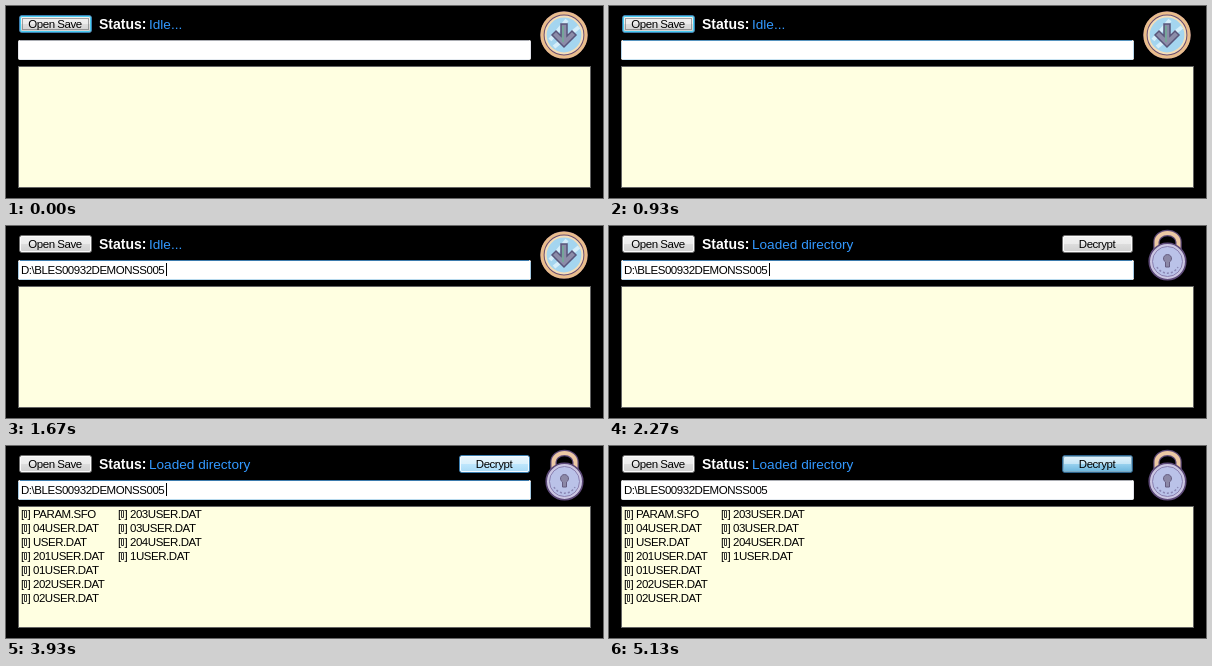
Animation of 597 by 192 pixels, one loop 8000 ms. Source, as an HTML page:

```html
<!DOCTYPE html>
<html lang="en">
<head>
<meta charset="utf-8">
<title>Save loader</title>
<style>
  html, body { margin: 0; height: 100%; overflow: hidden; background: #000; }
  svg { display: block; font: 11.5px "Liberation Sans", Arial, sans-serif; letter-spacing: -0.04em; }
  .status { letter-spacing: 0; }
  text { white-space: pre; }
</style>
</head>
<body>
<svg id="stage" width="597" height="192" viewBox="0 0 597 192"></svg>
<script>
const LOOP = 8000;
const PATH = 'D:\\BLES00932DEMONSS005';
const COLUMNS = [
  ['PARAM.SFO', '04USER.DAT', 'USER.DAT', '201USER.DAT', '01USER.DAT', '202USER.DAT', '02USER.DAT'],
  ['203USER.DAT', '03USER.DAT', '204USER.DAT', '1USER.DAT'],
];

// Button: border, inner line, four gradient stops. Field: top, sides, bottom.
const BUTTONS = {
  normal: ['#707070', '#fcfcfc', '#f2f2f2', '#ebebeb', '#dddddd', '#cfcfcf'],
  focused: ['#3c7fb1', '#48cdf0', '#f2f2f2', '#ebebeb', '#dddddd', '#cfcfcf'],
  hot: ['#3c7fb1', '#f4fbff', '#eaf6fd', '#d9f0fc', '#bee6fd', '#a7d9f5'],
  pressed: ['#2c628b', '#7ba7c0', '#e5f4fc', '#c4e5f6', '#98d1ef', '#68b3db'],
};
const FIELDS = {
  normal: ['#abadb3', '#e2e3ea', '#e3e9ef'],
  hot: ['#5794bf', '#b7d5ea', '#c7e2f1'],
  focused: ['#3d7bad', '#a4c9e3', '#b7d9ed'],
};

// Each step changes part of the state and keeps the rest.
const STEPS = [
  [0, { open: 'focused', decrypt: '', field: 'normal', path: '', caret: 0, loaded: false, list: false }],
  [930, { field: 'hot' }],
  [1330, { open: 'normal', field: 'focused', caret: 15 }],
  [1670, { path: PATH, caret: 160 }],
  [2270, { loaded: true, decrypt: 'normal' }],
  [2400, { list: true }],
  [3930, { decrypt: 'hot' }],
  [5130, { decrypt: 'pressed', field: 'normal', caret: 0 }],
];

const text = (x, y, s, attrs = '') => `<text x="${x}" y="${y}" ${attrs}>${s}</text>`;
const line = (d, color) => `<path d="${d}" fill="none" stroke="${color}"/>`;

function button(x, w, label, look) {
  const [border, inner, ...stops] = BUTTONS[look];
  const offsets = [0, 0.5, 0.5, 1];
  const id = 'fill' + x;
  const dots = look === 'focused'
    ? `<rect x="${x + 3.5}" y="12.5" width="${w - 7}" height="11" fill="none" stroke="#555" stroke-dasharray="1"/>` : '';
  return `<linearGradient id="${id}" x2="0" y2="1">${stops.map((c, i) =>
      `<stop offset="${offsets[i]}" stop-color="${c}"/>`).join('')}</linearGradient>
    <rect x="${x + 0.5}" y="9.5" width="${w - 1}" height="17" rx="2.5" fill="url(#${id})" stroke="${border}"/>
    <rect x="${x + 1.5}" y="10.5" width="${w - 3}" height="15" rx="1.5" fill="none" stroke="${inner}"/>
    ${dots}${text(x + w / 2 - 0.5, 22, label, 'text-anchor="middle"')}`;
}

function field({ field, path, caret }) {
  const [top, side, bottom] = FIELDS[field];
  return `<rect x="12" y="34" width="513" height="20" rx="2" fill="#fff"/>`
    + line('M12.5 36V52M524.5 36V52', side) + line('M14 53.5H523', bottom) + line('M14 34.5H523', top)
    + text(15, 48, path) + (caret ? line(`M${caret + 0.5} 37V50`, '#000') : '');
}

function fileList() {
  return COLUMNS.map((names, col) => names.map((name, row) => {
    const x = 15 + 97 * col, y = 72 + 14 * row;
    return text(x, y, '[') + text(x + 6.5, y, ']') + text(x + 12, y, name)
      + line(`M${x + 3.5} ${y - 7.5}h2v7h-2z`, '#333');
  }).join('')).join('');
}

const ARROW = `
  <circle cx="558" cy="29" r="23.7" fill="#694c70"/>
  <circle cx="558" cy="29" r="22" fill="none" stroke="#e9bd8c" stroke-width="3.2"/>
  <circle cx="558" cy="29" r="18.4" fill="#a4d5ef" stroke="#f4deb9" stroke-width="2"/>
  <path d="M544 34L561 14M548 41L573 21" stroke="#d5eefa" stroke-width="4"/>
  <path d="M555 18h6v12l5-5 4 4-12 12-12-12 4-4 5 5z" fill="#8c8ca8" stroke="#58557a" stroke-width="1.5"/>
  <path d="M557 20v16" stroke="#75a699" stroke-width="2"/>`;

const LOCK = `
  <path d="M547.5 24V16a11 9 0 0 1 22 0V24" fill="none" stroke="#5d4a78" stroke-width="6.5"/>
  <path d="M547.5 24V16a11 9 0 0 1 22 0V24" fill="none" stroke="#ecc8a4" stroke-width="4"/>
  <circle cx="558.5" cy="35.5" r="18.3" fill="#cbc6e2" stroke="#5d4a78" stroke-width="1.6"/>
  <circle cx="558.5" cy="35.5" r="15" fill="#bac2e8" stroke="#8a80b0"/>
  <path d="M548 41a12 12 0 0 0 21 0" fill="none" stroke="#8a86b4" stroke-width="1.5" stroke-dasharray="2"/>
  <path d="M556.5 36a4 4 0 1 1 4 0v5h-4z" fill="#8c88a6" stroke="#655c80"/>`;

const stage = document.getElementById('stage');

function render(state) {
  stage.innerHTML = `<rect width="597" height="192"/>
    ${button(13, 73, 'Open Save', state.open)}
    ${text(93, 23, 'Status:', 'class="status" fill="#fff" font-size="14" font-weight="bold"')}
    ${text(143, 23, state.loaded ? 'Loaded directory' : 'Idle...', 'class="status" fill="#3399ff" font-size="13.6"')}
    ${state.decrypt ? button(453, 71, 'Decrypt', state.decrypt) : ''}
    ${state.loaded ? LOCK : ARROW}
    ${field(state)}
    <rect x="12.5" y="60.5" width="572" height="121" fill="#ffffe1" stroke="#646464"/>
    ${state.list ? fileList() : ''}`;
}

let shown = 0;
function tick() {
  const t = performance.now() % LOOP;
  const passed = STEPS.filter(([start]) => start <= t);
  if (passed.length !== shown) {
    shown = passed.length;
    render(Object.assign({}, ...passed.map(([, change]) => change)));
  }
  requestAnimationFrame(tick);
}
tick();
</script>
</body>
</html>
```
